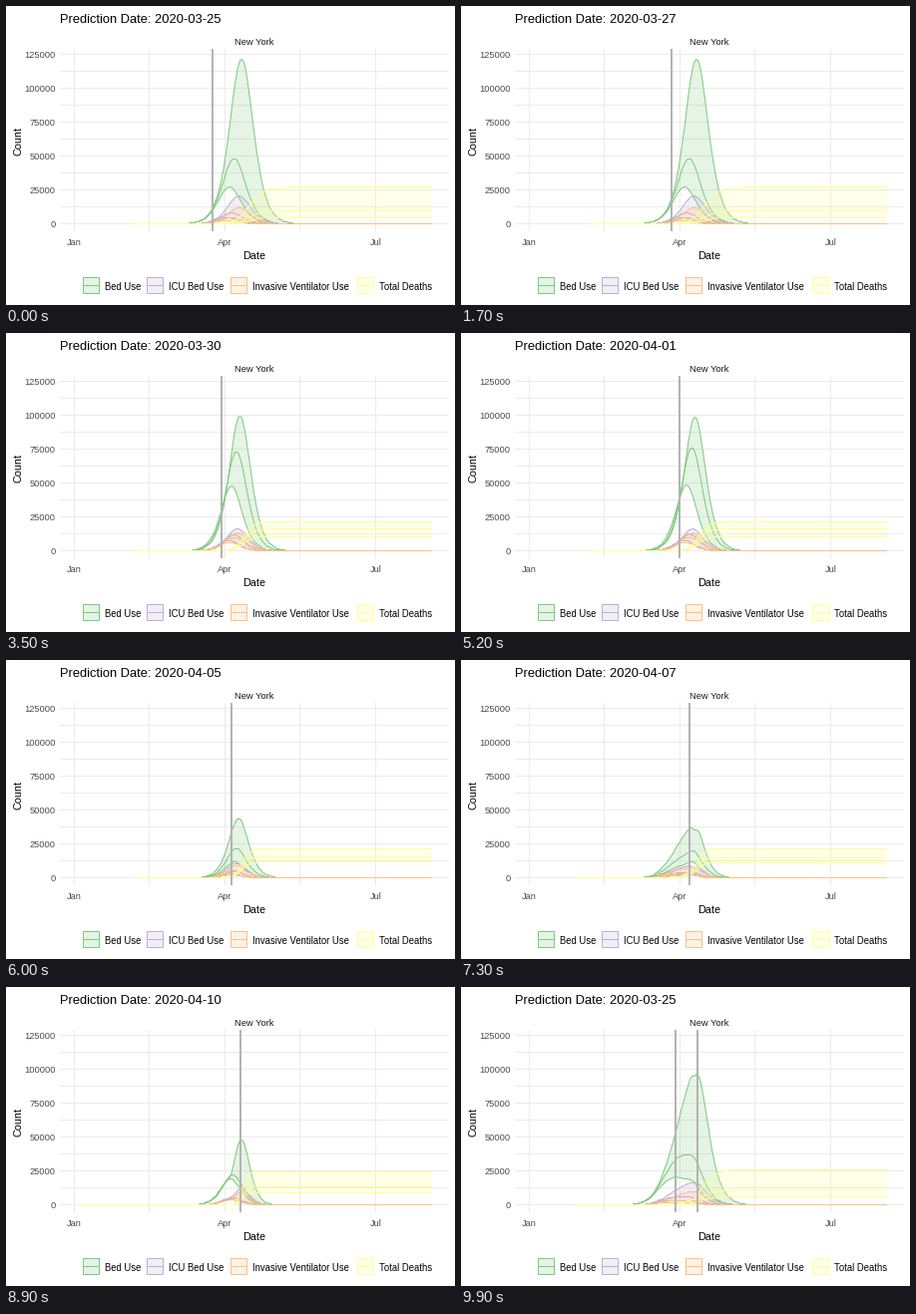
Write a matplotlib script that moves like this. It is 450 px wide and 300 px high and loops after 10 s.

```python
import numpy as np
import matplotlib.pyplot as plt
from matplotlib.animation import FuncAnimation
from matplotlib.patches import Polygon, Rectangle

W, H, DPI = 450, 300, 72
plt.rcParams["font.family"] = "Liberation Sans"

JAN, DAY = 68.0, 151 / 91          # pixel of Jan 1, pixels per day
EARLY, LATE, END = 71.3, 128.0, 427.0
ZERO, UNIT = 218.5, 1.36           # pixel of count 0, pixels per thousand
LEFT, RIGHT, TOP, BOTTOM = 54, 444, 43, 226
GRID, GREY = "#EBEBEB", "#B3B3B3"
COLORS = ["#7FC97F", "#BEAED4", "#FDC086", "#FFFF99"]

DAYS = [84, 85, 86, 88, 89, 90, 91, 95, 97, 98, 100, 102]
ARRIVALS = [8 * (k + 1) + min(k, 4) for k in range(len(DAYS))]
MOVE = 4


def forecast(day):
    """Thousands as (low, middle, high); first and last peak in pixels."""
    if day < 88:
        return dict(start=LATE, beds=(27.5, 48.5, 122), peaks=(224, 236),
                    width=15.8, icu=.17, vent=.1,
                    deaths=(5, 10.3, 27.3), turn=244, pace=7)
    if day < 95:
        d = day - 89
        return dict(start=LATE, beds=(48 + d / 2, 73.5 + 1.5 * d, 100 - d / 2),
                    peaks=(226, 234.5), width=14.3, icu=.165, vent=.135,
                    deaths=(11, 16.4, 21.6), turn=238, pace=5)
    if day < 98:
        return dict(start=LATE, beds=(12, 22, 44), peaks=(229, 233),
                    width=13.5, icu=.25, vent=.21,
                    deaths=(12, 16, 21.5), turn=236, pace=4)
    d = abs(day - 100)
    return dict(start=EARLY, beds=(19.5, 22.5, 55 - 13 * d), peaks=(225, 236),
                width=13.5, icu=.25, vent=.2,
                deaths=(9.5, 13.7, 25.5 - d), turn=237, pace=3)


def bump(x, peak, height, width):
    return height / np.cosh((x - peak) / width) ** 2


def curves(f, x):
    """Low, middle and high curve of the four series."""
    beds, width = np.array(f["beds"]), f["width"]
    rank = np.log(beds / beds[0]) / np.log(beds[2] / beds[0])
    first, last = f["peaks"]
    peaks = first + (last - first) * rank
    observed = f["start"] == EARLY
    out = []
    for share in (1, f["icu"], f["vent"]):
        shift = 0 if share == 1 or observed else 2.5
        low, mid, high = (bump(x, p - shift, h * share, width)
                          for p, h in zip(peaks, beds))
        if observed:
            # the high case leaves the known history in a sharp spike
            spike = bump(x, last, beds[2] * share, 11)
            high = np.maximum(np.where(x < first + 1, low, 0), spike)
        out.append([low, mid, high])
    rise = 1 / (1 + np.exp((f["turn"] - x) / f["pace"]))
    out.append([d * rise for d in f["deaths"]])
    return np.array(out)


def warp(x):
    """Position on the long time span paired with x on the short one."""
    u = np.clip((x - 209) / 36, 0, 1)
    return x - (LATE - EARLY) * (1 - u * u * (3 - 2 * u))


def blend(a, b, t):
    if a["start"] == b["start"]:
        xa = xb = np.linspace(a["start"], END, 217)
    else:
        short = np.linspace(LATE, END, 217)
        xa, xb = (short if f["start"] == LATE else warp(short) for f in (a, b))
    return (1 - t) * xa + t * xb, (1 - t) * curves(a, xa) + t * curves(b, xb)


def moment(n):
    """The two days around a frame and the share of the second."""
    k = next(i for i, end in enumerate(ARRIVALS) if n < end)
    t = max(0, (n - ARRIVALS[k] + MOVE) / MOVE)
    return DAYS[k], DAYS[(k + 1) % len(DAYS)], t


def row(y):
    """Centre of the pixel row nearest to y."""
    return np.floor(y + 1e-6) + .5


fig = plt.figure(figsize=(W / DPI, H / DPI), dpi=DPI, facecolor="white")
ax = fig.add_axes([0, 0, 1, 1])
ax.set_xlim(0, W)
ax.set_ylim(H, 0)
ax.axis("off")


def text(x, y, s, size, color="black", **kw):
    return ax.text(x, y, s, fontsize=size, color=color, **kw)


def segment(x0, y0, x1, y1, color, width=1, z=1):
    return ax.plot([x0, x1], [y0, y1], color=color, lw=width, zorder=z,
                   snap=False, solid_capstyle="butt")[0]


for k in range(11):
    y = row(ZERO - k * 12.5 * UNIT)
    segment(LEFT, y, RIGHT, y, GRID)
    if k % 2 == 0:
        text(49.5, y + 3.5, str(k * 12500), 9.3, "#4D4D4D", ha="right")
for k, name in enumerate(["Jan", "", "Apr", "", "Jul"]):
    x = row(JAN + k * 45.5 * DAY)
    segment(x, TOP, x, BOTTOM, GRID)
    text(x, 240, name, 9.3, "#4D4D4D", ha="center")

title = text(54, 17, "", 12.9)
text(249, 39, "New York", 9.4, "#1A1A1A", ha="center")
text(249, 254, "Date", 10.7, ha="center")
text(12, 136, "Count", 10.7, rotation=90, ha="center", va="center")

KEYS = {77: "Bed Use", 141: "ICU Bed Use",
        225: "Invasive Ventilator Use", 352: "Total Deaths"}
for (x, name), color in zip(KEYS.items(), COLORS):
    for style in (dict(fc=color, alpha=.2, lw=0),
                  dict(fill=False, ec=color, lw=1)):
        ax.add_patch(Rectangle((x + .5, 272.5), 16, 16, snap=False, **style))
    segment(x + 1, 280.5, x + 16, 280.5, color)
    text(x + 22, 285, name, 9.5)

bands, lines = [], []
for i, color in enumerate(COLORS):
    band = Polygon(np.zeros((3, 2)), fc=color, alpha=.2, lw=0, zorder=3 + i)
    bands.append(ax.add_patch(band))
    lines.append([segment(0, 0, 0, 0, color, 1, 3.5 + i) for _ in range(3)])
marker, leftover = (segment(0, TOP, 0, BOTTOM, GREY, 2, 9) for _ in range(2))


def place(line, day):
    x = np.floor(JAN + day * DAY + .5)
    line.set_xdata([x, x])


def draw(n):
    day_a, day_b, t = moment(n)
    shown = np.datetime64("2020-01-01") + (day_b if t > .5 else day_a)
    title.set_text(f"Prediction Date: {shown}")
    place(marker, day_a + t * (day_b - day_a))
    place(leftover, day_a)
    leftover.set_visible(day_b < day_a and t > 0)

    x, values = blend(forecast(day_a), forecast(day_b), t)
    for band, trio, ys in zip(bands, lines, row(ZERO - UNIT * values + .5)):
        ys = np.minimum(ys, ZERO)
        band.set_xy(np.column_stack([np.r_[x, x[::-1]],
                                     np.r_[ys[2], ys[0][::-1]]]))
        for line, y in zip(trio, ys):
            line.set_data(x, y)
    return []


anim = FuncAnimation(fig, draw, frames=100, interval=100, repeat=True,
                     repeat_delay=0, init_func=lambda: draw(0), blit=False)
plt.show()
```
